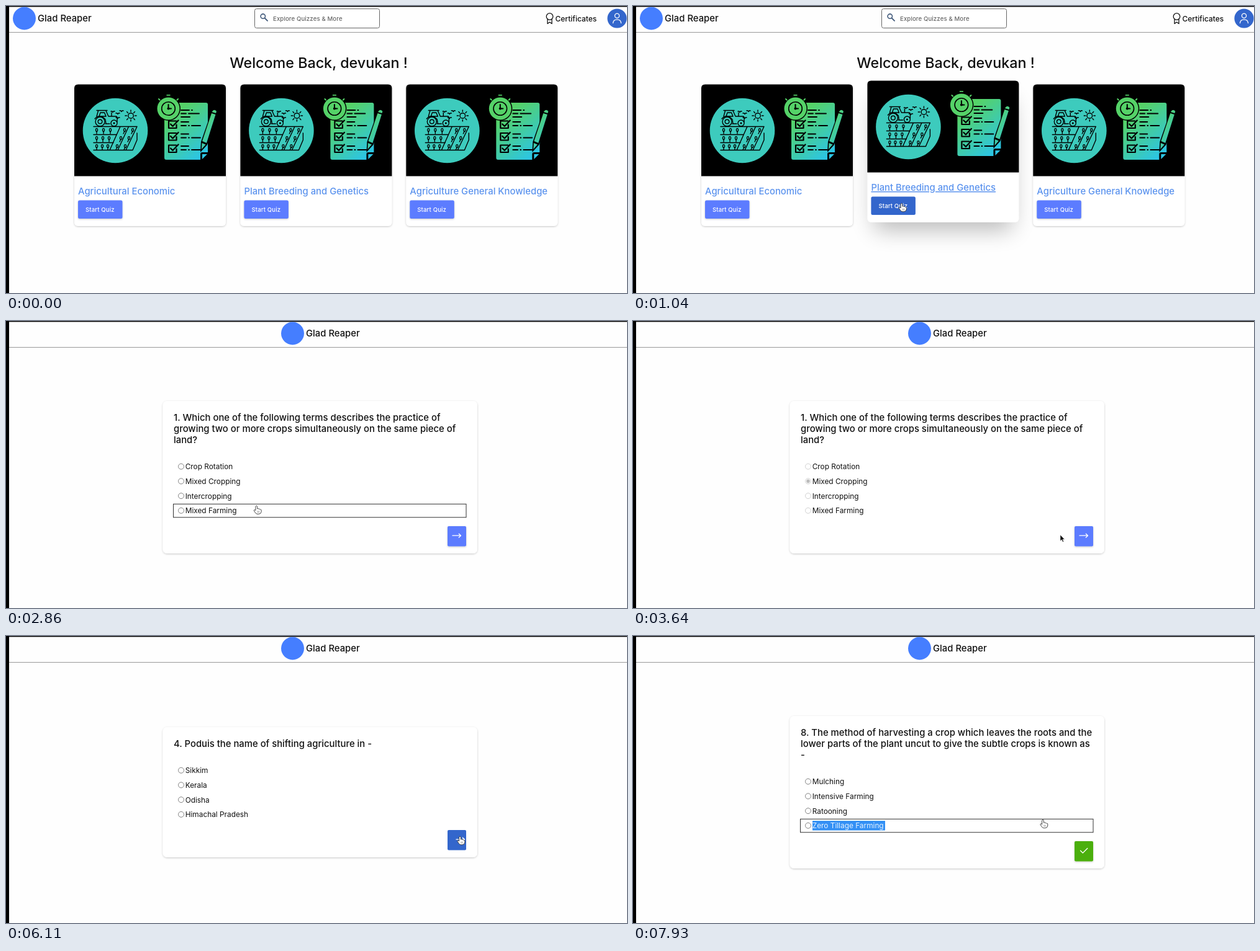
These frames come from a looping animation (1000x463 px, 8 s). An HTML page:

```html
<!DOCTYPE html>
<html lang="en">
<head>
<meta charset="utf-8">
<title>Farming quiz</title>
<style>
html, body { margin: 0; height: 100%; overflow: hidden; background: #000; }
svg { display: block; width: 100vw; height: 100vh; font-family: Inter, sans-serif; }
text { fill: #111; white-space: pre; }
.m { font-size: 14.85px; font-weight: 500; }
.s { font-size: 11.85px; }
.xs { font-size: 9.6px; font-weight: 500; letter-spacing: .12px; }
.ink { fill: none; stroke: #000; stroke-width: 1.4; stroke-linecap: round; stroke-linejoin: round; }
</style>
</head>
<body>
<svg id="stage" viewBox="0 0 1000 463">
  <defs>
    <linearGradient id="sheet" x1=".1" y1="0" x2=".75" y2="1">
      <stop offset=".2" stop-color="#55d268"/><stop offset="1" stop-color="#2cc5e4"/>
    </linearGradient>
    <filter id="low" x="-10%" y="-10%" width="120%" height="125%">
      <feDropShadow dx="0" dy="1" stdDeviation="1.8" flood-opacity=".22"/>
    </filter>
    <filter id="blur" x="-40%" y="-40%" width="180%" height="180%">
      <feGaussianBlur stdDeviation="18"/>
    </filter>
    <g id="art"></g>
  </defs>
  <rect x="5" y="1.4" width="995" height="461.6" fill="#fefefe"/>
  <g id="scene"></g>
</svg>
<script>
const LOOP = 8000, STEP = 130;
const BLUE = '#5b7cff', DARK = '#3366cc';
const $ = id => document.getElementById(id);
const range = n => [...Array(n).keys()];

const text = (x, y, s, cls, more = '') => `<text x="${x}" y="${y}" class="${cls}" ${more}>${s}</text>`;
const rect = (x, y, w, h, fill, more = '') =>
  `<rect x="${x}" y="${y}" width="${w}" height="${h}" fill="${fill}" ${more}/>`;
const circle = (x, y, r, fill, more = '') => `<circle cx="${x}" cy="${y}" r="${r}" fill="${fill}" ${more}/>`;
const path = (d, more = 'class="ink"') => `<path d="${d}" ${more}/>`;
const line = (color, width) =>
  `fill="none" stroke="${color}" stroke-width="${width}" stroke-linecap="round" stroke-linejoin="round"`;

// Picture on the quiz cards, in the place of the first card
function fieldArt() {
  const plant = (x, y, lean) => path(`M${x} ${y + 5}l${lean} -4`) +
    `<ellipse cx="${x + lean}" cy="${y - 1}" rx="1.6" ry="2.4" class="ink" style="stroke-width:1.2"/>`;
  const rows = range(3).map(r => {
    const y = 201 + r * 13;
    return range(3).map(c => plant(146 + c * (11 - r), y, 0)).join('') +
      range(2).map(c => plant(189 + c * 13 - r * 6, y, 2)).join('');
  }).join('');
  const furrows = path('M141 194.5H211M141 207.5H178M141 220.5H173M141 232.5H204M184 194.5L167 232.5M197.5 194.5L180 232.5M211 194.5L193 232.5M211 205V216L204 232.5');
  const rays = range(8).map(i => `<path d="M201 170.5v-2.6" class="ink" transform="rotate(${i * 45} 201 177)"/>`).join('');
  const birds = [[172, 171], [180, 174], [186, 170], [180, 181]]
    .map(([x, y]) => path(`M${x - 3} ${y - 1}q2 -1 3 1.5q1 -2.5 3 -1.5`)).join('');
  const tractor = path('M146 168.5H163M148.5 169L146 178M161 169L165 178H177Q179 178 179 181V187M152 172H158.5L161 178H150ZM170 178V172M160 190H167M143 182Q151 173 160 183L161 190') +
    circle(151.5, 186.5, 7.5, 'none', 'class="ink"') + circle(151.5, 186.5, 3.3, 'none', 'class="ink"') +
    circle(174, 189, 5, 'none', 'class="ink"') + circle(174, 189, 1.5, '#000');
  return circle(176, 201, 52.3, '#3dcbbd') + tractor + birds + rays +
    circle(201, 177, 4.3, 'none', 'class="ink"') + furrows + rows;
}

function listArt() {
  const dash = (y, d) => `<path d="M282 ${y}H313" ${line('#000', 1.8)} stroke-dasharray="${d}"/>`;
  const items = range(3).map(i => {
    const y = 185.5 + i * 19.5;
    return path(`M274 ${y}H262V${y + 11.5}H274.5V${y + 6}M265 ${y + 5}L268.5 ${y + 8.5}L277.5 ${y - 1}`, line('#000', 2.2)) +
      dash(y + 1.5, '12 50') + dash(y + 7.5, '8 4 1 4 14 50');
  }).join('');
  const clock = circle(261.5, 165.5, 19.5, '#000') + rect(258.5, 143, 6, 1.6, '#55d268') +
    path('M247.5 151.5l-1.5 -1.5M275.5 151.5l1.5 -1.5', line('#55d268', 2)) + circle(261.5, 165.5, 18, '#55d268') +
    circle(261.5, 165.5, 10.8, 'none', 'stroke="#000" stroke-width="1.6"') +
    path('M261.5 159V165.5H266', line('#000', 2)) + circle(261.5, 165.5, 2, '#000');
  const pencil = path('M331 170L314 219L313 236L324 224L340 173Z', 'fill="#000"') +
    path('M333 169Q336 166 339 170L338 173L331.5 171ZM331 173L337.5 175L323 221L316 218ZM315.5 221L321.5 223.5L315 231Z', 'fill="url(#sheet)"');
  return path('M255 158Q255 156 257 156H322Q325 156 325 159V236H316Q313 236 313 239V248H258Q255 248 255 245Z', 'fill="url(#sheet)"') +
    path('M316 239H324L316 247Z', 'fill="#2cc5e4"') + dash(168, '13 4 1 50') + dash(173.5, '8 4 17 50') +
    dash(179, '14 50') + items + clock + pencil;
}
$('art').innerHTML = fieldArt() + listArt();

const brand = x => circle(x + 18.5, 20, 18.5, '#457eff') + text(x + 40, 25, 'Glad Reaper', 'm');
const header = rect(5, 42, 995, 1, '#999');

const homeBar = brand(11) + header +
  rect(400.5, 4.5, 201, 31, '#fff', 'rx="3" stroke="#666"') +
  circle(413.8, 16.6, 3.7, 'none', 'stroke="#41597a" stroke-width="1.6"') + path('M416.8 19.6L421 23.8', line('#41597a', 1.9)) +
  text(430, 23.7, 'Explore Quizzes &amp; More', 'xs', 'style="fill:#666"') +
  circle(875.5, 17, 5.3, 'none', 'stroke="#111" stroke-width="1.3"') +
  path('M872 21.5V28.5L875.5 26L879 28.5V21.5', line('#111', 1.3)) +
  text(884.5, 24.5, 'Certificates', 's', 'style="font-size:12px;font-weight:500"') +
  circle(984, 20, 15.6, DARK) + circle(984, 15.8, 3.6, 'none', 'stroke="#fff" stroke-width="1.3"') +
  path('M977.5 27.5Q978 21.8 984 21.8T990.5 27.5', line('#fff', 1.3));

function quizCard(dx, title, lift) {
  const on = lift > 0;
  return `<g transform="translate(${dx} ${-6 * lift})">` +
    (on ? rect(121, 160, 222, 207, '#000', `rx="6" filter="url(#blur)" opacity="${.27 * lift}"`) : '') +
    rect(110, 126.5, 244, 228.5, '#fff', `rx="6" ${on ? '' : 'filter="url(#low)"'}`) +
    path('M110 274.5V132.5Q110 126.5 116 126.5H348Q354 126.5 354 132.5V274.5Z', '') +
    '<use href="#art"/>' +
    text(116, 304, title, 'm', `style="fill:#5b93ee${on ? ';text-decoration:underline' : ''}"`) +
    rect(116, 313.5, 71.5, 29.5, on ? DARK : BLUE, `rx="2.5" ${on ? '' : 'filter="url(#low)"'}`) +
    text(128, 331.7, 'Start Quiz', 'xs', 'style="fill:#fff"') + '</g>';
}

function home(t) {
  const lift = Math.min(1, Math.max(0, (t - 650) / 300));
  return homeBar + text(360.3, 100, 'Welcome Back, devukan !', '', 'font-size="23.3" font-weight="500"') +
    quizCard(0, 'Agricultural Economic', 0) + quizCard(534.3, 'Agriculture General Knowledge', 0) +
    quizCard(267.4, 'Plant Breeding and Genetics', lift);
}

const loading = t => brand(443) + header +
  circle(508, 220.5, 19.8, 'none', `stroke="#6090ec" stroke-width="1.9" pathLength="4" stroke-dasharray="3 1"
    transform="rotate(${75 + (t - 1950) * .36} 508 220.5)"`);

// from: time shown; pick: chosen answer; done: time it is chosen
const questions = [
  { from: 2210, pick: 1, done: 3120,
    ask: ['1. Which one of the following terms describes the practice of', 'growing two or more crops simultaneously on the same piece of', 'land?'],
    options: ['Crop Rotation', 'Mixed Cropping', 'Intercropping', 'Mixed Farming'] },
  { from: 4160, pick: 3, done: 5200,
    ask: ['2. Dry land farming in India is largely confined to areas with rainfall', 'less than -'],
    options: [' 100 Cm', '85 Cm', '80 Cm', '75 Cm'] },
  { from: 5720, pick: 2, done: 6760,
    ask: ['4. Poduis the name of shifting agriculture in -'],
    options: ['Sikkim', 'Kerala', 'Odisha', 'Himachal Pradesh'] },
  { from: 7540, last: true, marked: 3,
    ask: ['8. The method of harvesting a crop which leaves the roots and the', 'lower parts of the plant uncut to give the subtle crops is known as', '-'],
    options: ['Mulching', 'Intensive Farming', 'Ratooning', 'Zero Tillage Farming'] }
];

function quiz(t, q, [mx, my]) {
  const n = q.ask.length, h = 192 + 18 * n, top = 252 - h / 2, by = top + h - 44;
  const locked = t >= q.done, tone = locked ? '#ccc' : '#777';
  const over = mx >= 711 && mx <= 741 && my >= by && my <= by + 32.5;
  let hand = over;
  let out = brand(443) + header + rect(252.5, top, 506.5, h, '#fff', 'rx="7" filter="url(#low)"') +
    q.ask.map((s, i) => text(270, top + 32.3 + i * 18, s, 'm')).join('');
  q.options.forEach((s, i) => {
    const y = top + 52 + 18 * n + i * 23.7;
    const marked = q.marked === i;
    if (mx > 270 && mx < 741 && Math.abs(my - y) < 11) {
      hand = true;
      out += rect(269.5, y - 10.8, 471.5, 21.5, 'none', 'stroke="#333"');
    }
    if (marked) out += rect(289, y - 8, 117, 15.5, '#3390f5');
    out += circle(282, y - .3, 4.5, '#fff', `stroke="${tone}" stroke-width=".9"`) +
      (locked && q.pick === i ? circle(282, y - .3, 2.8, '#bbb') : '') +
      text(s[0] === ' ' ? 292 : 288.7, y + 4.3, s.trim(), 's', marked ? 'style="fill:#e4f2ff"' : '');
  });
  const ax = over ? 725 : 719, ay = by + 15.2;
  out += rect(711, by, 30, 32.5, q.last ? '#4caf0d' : over ? DARK : BLUE, `rx="2" ${over ? '' : 'filter="url(#low)"'}`) +
    (q.last ? path(`M720.5 ${ay}l3.8 3.8l7.5 -7.5`, line('#fff', 1.3))
      : path(`M${ax} ${ay}h13.5m-3.2 -3l3.2 3l-3.2 3`, line('#fff', 1.3)));
  return [out, hand];
}

// Pointer: time, x, y of its tip
const track = [
  [390, 480, 460], [780, 432.5, 319], [2730, 432.5, 319], [3120, 345, 258], [3250, 345, 258],
  [3640, 688, 345], [3770, 688, 345], [4030, 730.5, 351.5], [4680, 730.5, 351.5], [4810, 335, 293],
  [5200, 335, 293], [5590, 731, 324], [6110, 731, 324], [6500, 335, 261], [7020, 335, 261],
  [7410, 731, 337], [7800, 731, 337], [7930, 660, 297]
];
function pointerAt(t) {
  const i = track.findIndex(k => k[0] >= t);
  if (i < 1) return track[i < 0 ? track.length - 1 : 0].slice(1);
  const [t0, x0, y0] = track[i - 1], [t1, x1, y1] = track[i];
  const p = (t - t0) / (t1 - t0);
  return [x0 + (x1 - x0) * p, y0 + (y1 - y0) * p];
}
const pointer = ([x, y], hand) => `<g transform="translate(${x} ${y})" stroke-linejoin="round">` + (hand
  ? path('M-1.4 7V.8Q-1.2 -.6 0 -.6T1.4 .8V4.2Q3 3.2 3.9 4.7Q5.4 4 6 5.4Q7.8 5 7.8 6.8V9Q7.4 12.8 3.4 12.8H1.6Q-.8 12.6 -2 10.4L-4 7.4Q-4.2 5.8 -2.8 5.8Z', 'fill="#fff" stroke="#333" stroke-width=".9"') +
    path('M2 8V10.4M4 8V10.4', line('#555', .6))
  : path('M0 0V10L2.3 7.8L4 11.4L5.6 10.7L4 7.2H7Z', 'fill="#111" stroke="#fff" stroke-width=".5"')) + '</g>';

function draw(t) {
  const at = pointerAt(t);
  const q = questions.filter(k => t >= k.from).pop();
  let out, hand = t >= 780;
  if (q) [out, hand] = quiz(t, q, at);
  else out = t < 1430 ? home(t) : loading(t);
  $('scene').innerHTML = out + (t >= 390 ? pointer(at, hand) : '');
}

let shown = -1;
function tick(now) {
  const t = Math.floor(now % LOOP / STEP) * STEP;
  if (t !== shown) draw(shown = t);
  requestAnimationFrame(tick);
}
tick(performance.now());
</script>
</body>
</html>
```
